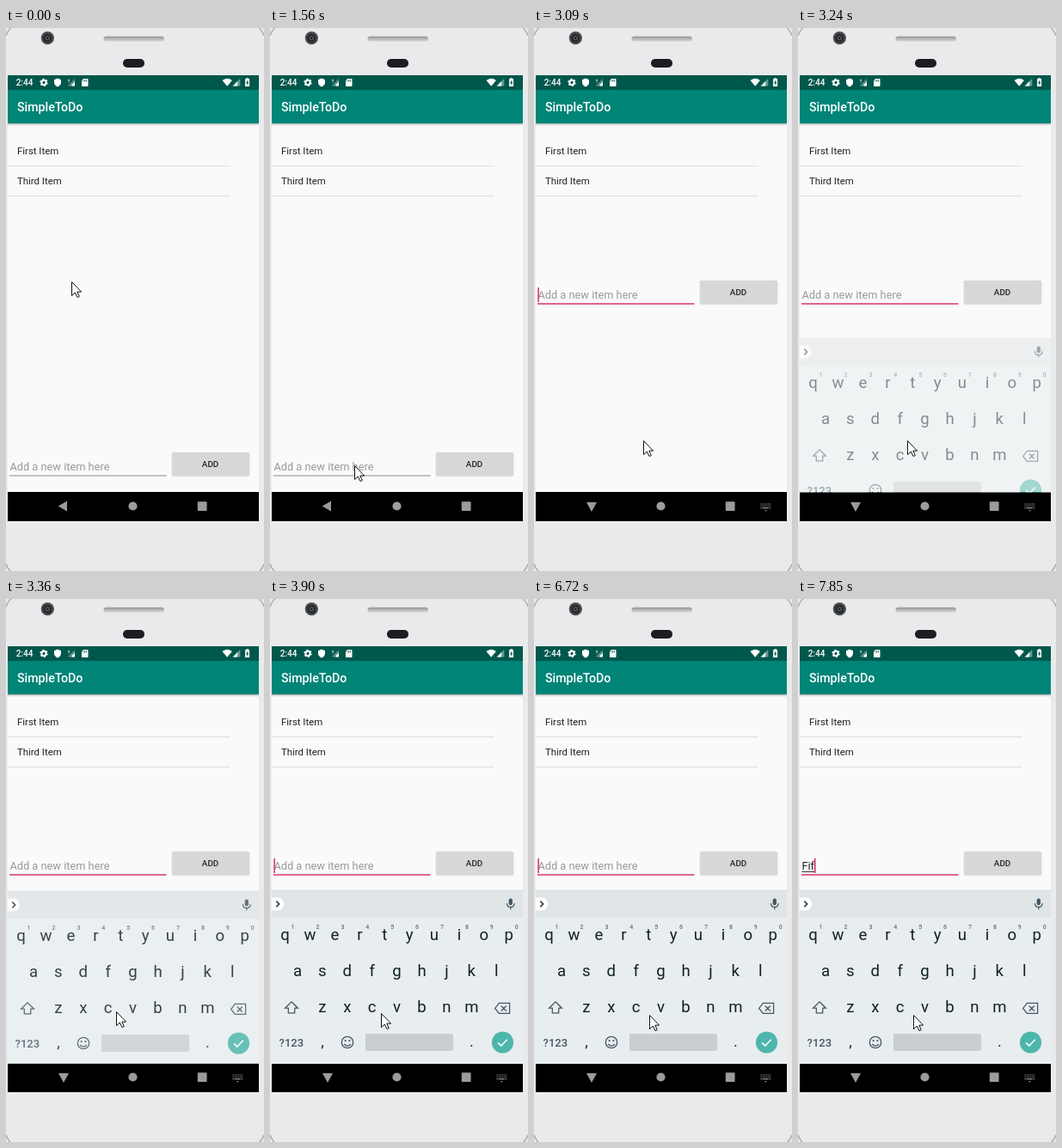
An HTML page that plays this animation: 300 by 632 pixels, repeating every 8000 ms.

```html
<!DOCTYPE html>
<html lang="en">
<head>
<meta charset="utf-8">
<title>To-do list</title>
<style>
html, body { margin: 0; width: 100%; height: 100%; overflow: hidden; background: #e9eaec; }
svg { display: block; width: 100vw; height: 100vh; font-family: Roboto, "Noto Sans", sans-serif; }
.mid { text-anchor: middle; }
.med { font-weight: 500; }
</style>
</head>
<body>
<svg viewBox="0 0 300 632" xmlns="http://www.w3.org/2000/svg">
  <defs>
    <linearGradient id="shade" x1="0" y1="0" x2="0" y2="1">
      <stop offset="0" stop-color="#000" stop-opacity=".28"/>
      <stop offset="1" stop-color="#000" stop-opacity="0"/>
    </linearGradient>
    <linearGradient id="slot" x1="0" y1="0" x2="0" y2="1">
      <stop offset="0" stop-color="#8f8f8f"/>
      <stop offset=".5" stop-color="#b9b9b9"/>
      <stop offset="1" stop-color="#cfcfcf"/>
    </linearGradient>
    <clipPath id="above"><rect x="2" y="330" width="292" height="211"/></clipPath>
  </defs>

  <!-- phone body -->
  <rect width="300" height="632" fill="#e9eaec"/>
  <g fill="none" stroke="#a9abad" stroke-width="1.5">
    <path d="M0 9Q2 3 6 0M300 9Q298 3 294 0M0 624Q2 629 5 632M300 624Q298 629 295 632"/>
  </g>
  <circle cx="48.3" cy="11.7" r="7.6" fill="#4a4c4e"/>
  <circle cx="48.3" cy="11.7" r="5.2" fill="#26282a"/>
  <circle cx="48.3" cy="11.7" r="2.6" fill="#55585c"/>
  <circle cx="48.3" cy="11.7" r="1.2" fill="#1b1c1e"/>
  <rect x="113.5" y="9.8" width="70.5" height="5.6" rx="2.8" fill="url(#slot)"/>
  <rect x="136" y="36" width="25" height="10" rx="4.8" fill="#1d1d21"/>

  <!-- app -->
  <rect x="2" y="55" width="292" height="519" fill="#fafafa"/>
  <rect x="2" y="55" width="292" height="17" fill="#00574b"/>
  <rect x="2" y="72" width="292" height="39" fill="#008577"/>
  <rect x="2" y="111" width="292" height="3" fill="url(#shade)"/>
  <text x="13" y="97" font-size="14.2" class="med" fill="#fff">SimpleToDo</text>
  <text x="11.7" y="67.2" font-size="10" class="med" fill="#fff">2:44</text>
  <g fill="#fff">
    <circle cx="44" cy="63.4" r="2.6" fill="none" stroke="#fff" stroke-width="2"/>
    <circle cx="44" cy="63.4" r="4" fill="none" stroke="#fff" stroke-width="1.4" stroke-dasharray="2.1 2.09"/>
    <path d="M60 58.6l4 1.6v3q0 3.6-4 5.2q-4-1.6-4-5.2v-3z"/>
    <path d="M80 59v8.6h-8.4z" fill-opacity=".35"/>
    <path d="M80 62.5v5.1h-3.5v-1.6z"/>
    <text x="71.6" y="64" font-size="6" class="med">?</text>
    <path d="M90.2 59h4.6q.7 0 .7.7v7.6q0 .7-.7.7h-6.1q-.7 0-.7-.7v-6z"/>
    <path d="M89.8 61v1.6M91.6 60v2.6M93.4 60v2.6" stroke="#00574b" stroke-width=".8"/>
    <path d="M251.5 61q5.7-4.4 11.4 0l-5.7 6.8z"/>
    <path d="M272.3 58.8v8.8h-8.6z" fill-opacity=".4"/>
    <path d="M269.2 62v5.6h-5.5z"/>
    <path d="M279.3 59.3v-1h2.6v1h1.2v8.7h-5v-8.7z"/>
    <path d="M281 60.6l-2 3.6h1.3v2.6l2-3.7h-1.3z" fill="#00574b"/>
  </g>
  <g font-size="11.4" fill="#212121">
    <text x="13" y="147">First Item</text>
    <text x="13" y="182">Third Item</text>
  </g>
  <path d="M2 160.5H261M2 195.5H261" stroke="#dedede"/>

  <!-- entry row -->
  <g id="row">
    <text id="entry" x="4.4" y="515.4" font-size="12.8"></text>
    <path id="compose" stroke="#212121" stroke-width=".9"/>
    <path id="line" d="M4 521H186.5"/>
    <rect id="caret" x="4.4" y="502" width="1.4" height="17" fill="#d81b60"/>
    <rect x="192.5" y="494.6" width="91" height="27.6" rx="2" fill="#000" opacity=".1"/>
    <rect x="193" y="493.8" width="90" height="27.2" rx="1.5" fill="#d6d7d7"/>
    <text x="237.6" y="510.9" font-size="9.9" class="mid med" fill="#212121">ADD</text>
  </g>

  <!-- navigation bar -->
  <rect x="2" y="540" width="292" height="34" fill="#000"/>
  <g fill="#9b9b9b">
    <path id="back"/>
    <circle cx="147.5" cy="556.5" r="5.1"/>
    <rect x="222.8" y="551.3" width="10.8" height="10.6" rx=".6"/>
    <g id="dots" stroke="#9b9b9b" stroke-width="1.1" fill="none">
      <path d="M263.5 554H275M263.5 556.3H275" stroke-dasharray="1.2 .86"/>
      <path d="M263.5 558.6h1.2M265.6 558.6h7.2M273.8 558.6h1.2"/>
      <path d="M267.6 561.2h3.4l-1.7 1.3z" stroke="none" fill="#9b9b9b"/>
    </g>
  </g>

  <!-- keyboard -->
  <g clip-path="url(#above)">
    <g id="board">
      <rect x="2" y="339" width="292" height="202" fill="#e8edf0"/>
      <rect x="2" y="339" width="292" height="32" fill="#dfe4e7"/>
      <rect x="2" y="338" width="292" height="1" fill="#e9ecee"/>
      <path d="M2 347.5H8.5a7.5 7.5 0 0 1 0 15H2z" fill="#fff"/>
      <path d="M7.3 351.6l3.4 3.4-3.4 3.4" fill="none" stroke="#263238" stroke-width="1.5"/>
      <g fill="none" stroke="#455a64" stroke-width="1.3">
        <rect x="278.3" y="349.2" width="3" height="6.6" rx="1.5" fill="#455a64"/>
        <path d="M275.5 354.3q0 4.4 4.3 4.4t4.3-4.4M279.8 358.7v2.6"/>
        <path id="shift" d="M25 468.8l7.4 7.4h-3.7v5.6h-7.4v-5.6h-3.7z"/>
        <path d="M266.3 470.4H278.6V482.4H266.3L261.7 476.4zM268.8 473.5l6 6M274.8 473.5l-6 6"/>
        <circle cx="90" cy="516" r="6.7"/>
        <path d="M86.3 518q3.7 4.4 7.4 0"/>
      </g>
      <circle cx="87.6" cy="514" r="1.1" fill="#455a64"/>
      <circle cx="92.4" cy="514" r="1.1" fill="#455a64"/>
      <g id="keys" class="mid" font-size="18.6" fill="#102027"></g>
      <g id="digits" class="mid med" font-size="7" fill="#607078"></g>
      <text x="10.6" y="520.6" font-size="13" class="med" fill="#455a64">?123</text>
      <text x="61" y="521" font-size="18" class="mid" fill="#263238">,</text>
      <text x="234.3" y="521" font-size="18" class="mid" fill="#263238">.</text>
      <rect x="111" y="506" width="102" height="20" rx="2" fill="#c9ced1"/>
      <circle cx="270.5" cy="516" r="12.6" fill="#4db6ac"/>
      <path d="M265.2 516.4l3.6 3.6 7-7.2" fill="none" stroke="#fff" stroke-width="1.6"/>
    </g>
  </g>

  <path id="pointer" d="M.5.5V16.6L4.3 13 7 18.5 9.3 17.5 6.8 12.1H11.6z" fill="#fff" stroke="#111"/>
</svg>
<script>
const LOOP = 8000, STEP = 28.9;
const $ = id => document.getElementById(id);
const set = (el, attrs) => { for (const k in attrs) el.setAttribute(k, attrs[k]); };
const show = (id, on) => set($(id), { visibility: on ? "visible" : "hidden" });

// [time, x, y] of the pointer tip; it jumps from stop to stop
const stops = [
  [0, 76, 295], [120, 52, 262], [263, 24, 216], [407, 8, 188], [550, 19, 180],
  [1100, 38, 250], [1250, 70, 370], [1400, 92, 474], [1560, 98, 509],
  [2410, 103, 500], [2550, 113, 486], [2690, 121, 475], [2830, 126, 478], [2970, 127, 480],
  [3360, 128, 480], [3640, 129, 482], [4180, 130, 483], [4890, 131, 483],
  [5580, 133, 483], [5880, 134, 484]
];
// times at which the caret turns on, off, on ...
const blinks = [1990, 2410, 2830, 3240, 3770, 4180, 4740, 5270, 5880, 6290, 6720, 7280, 7710];
// [time, offset, opacity] of the rising keyboard
const rise = [[0, 200, 0], [3240, 22, .5], [3360, 1, .84], [3510, 0, 1]];
const typed = [[0, ""], [7710, "F"], [7850, "Fif"]];

const at = (list, t) => list.filter(s => s[0] <= t).pop();

function addText(group, x, y, str) {
  const el = document.createElementNS("http://www.w3.org/2000/svg", "text");
  set(el, { x, y });
  el.textContent = str;
  $(group).append(el);
  return el;
}

const keys = [["qwertyuiop", 17.6, 397], ["asdfghjkl", 32, 439], ["zxcvbnm", 60.9, 481]]
  .flatMap(([row, x, y]) => [...row].map((c, i) => [addText("keys", x + i * STEP, y, c), c]));
[..."1234567890"].forEach((d, i) => addText("digits", 26.6 + i * STEP, 383.8, d));

function draw(t) {
  const [, x, y] = at(stops, t);
  set($("pointer"), { transform: `translate(${x} ${y})` });

  const focus = t >= 1990, ime = t >= 2830;
  const blink = blinks.filter(b => b <= t).length % 2 === 1;
  set($("row"), { transform: `translate(0 ${t >= 3090 ? -200 : 0})` });
  set($("line"), { stroke: focus ? "#d8336f" : "#8c8c8c", "stroke-width": focus ? 1.5 : 1 });

  const word = at(typed, t)[1], entry = $("entry");
  const label = word || "Add a new item here";
  if (entry.textContent !== label) entry.textContent = label;
  set(entry, { fill: word ? "#212121" : "#9a9a9a" });
  const end = word ? 4.4 + entry.getComputedTextLength() : 4.4;
  set($("compose"), { d: `M4.4 517.5H${end}` });
  show("compose", word);
  set($("caret"), { x: end });
  show("caret", blink);

  set($("back"), { d: ime ? "M61 552H73L67 563z" : "M60.8 556.5L71 550.5V562.5z" });
  show("dots", ime);

  const [, drop, alpha] = at(rise, t);
  set($("board"), { transform: `translate(0 ${drop})`, opacity: alpha });
  const caps = t >= 7560 && t < 7850;
  for (const [el, c] of keys) {
    const s = caps ? c.toUpperCase() : c;
    if (el.textContent !== s) el.textContent = s;
  }
  set($("shift"), { fill: caps ? "#455a64" : "none" });
}

const start = performance.now();
function tick() {
  draw((performance.now() - start) % LOOP);
  requestAnimationFrame(tick);
}
tick();
</script>
</body>
</html>
```
